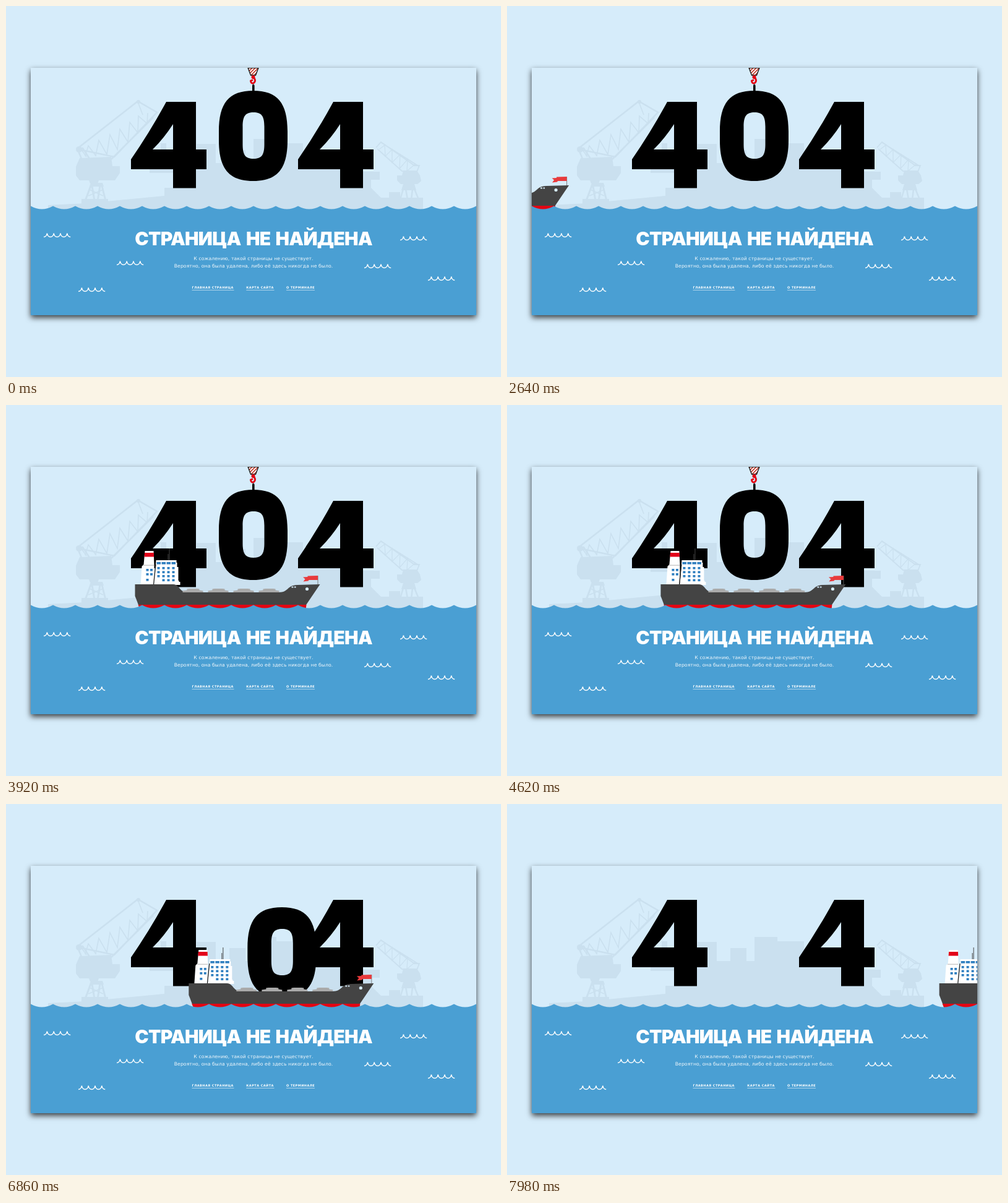
These frames come from a looping animation (800 px wide and 600 px high, 8 s). An HTML page:

```html
<!DOCTYPE html>
<html lang="ru">
<head>
<meta charset="utf-8">
<title>404</title>
<style>
  html, body { margin: 0; width: 100%; height: 100%; overflow: hidden; background: #d6ecfa; }
  #card { position: absolute; left: 40px; top: 100px; width: 720px; height: 400px;
    box-shadow: 0 4px 9px rgba(0, 0, 0, .75); }
  svg { position: absolute; left: 0; top: 0; display: block; }
  text { fill: #fff; text-anchor: middle; }
  .title { font: 900 30px Inter, sans-serif; letter-spacing: -.75px; word-spacing: 3px; }
  .note { font: 7.7px "DejaVu Sans", sans-serif; letter-spacing: .08px; fill-opacity: .92; }
  .link { font: bold 5px "DejaVu Sans", sans-serif; letter-spacing: .45px; text-anchor: start; }
</style>
</head>
<body>
<div id="card"></div>
<svg width="800" height="600" viewBox="0 0 800 600">
  <defs>
    <clipPath id="frame"><rect x="40" y="100" width="720" height="400"/></clipPath>
    <clipPath id="block"><path d="M391.5 100H407.5L403.5 111.5H395.5Z"/></clipPath>
    <path id="four" d="M259 155H307V232H324V264H307V294.5H270V264H202V248Q233 203 259 155ZM270 191Q256 213 237 232H270Z"/>
    <path id="ripple" fill="none" stroke="#fff" stroke-width="1.5"/>
    <path id="hatch" fill="#aaa" d="M0 303V300.500L7 299.500V297.500L11 297H23L27 297.500V299.500L33 300.500V303Z"/>
  </defs>
  <g clip-path="url(#frame)">
    <rect x="40" y="100" width="720" height="400" fill="#d6ecfa"/>

    <!-- harbour silhouettes -->
    <g fill="#cae0ef" stroke="#cae0ef" stroke-width="0">
      <path d="M68 330V322L130 319L256 307V294H270V270H232V236H260V232H308V223H339V254H361V233H387V254H400V215H437V222H480V254H540V268H604V281H590V294L606 310H619V301H637V310H674V330Z"/>
      <path d="M250 232V222H259V232Z"/>
      <path d="M113 260L119 246L170 244L172 259H184V270L176 282H150L148 287H136L134 282H119L113 274Z"/>
      <path d="M137 286H156L158 292H135ZM122 312H165V320H122Z"/>
      <path fill="none" stroke-width="3" d="M137 291L128 315M155 291L161 315M139 291L143 315M152 291L148 315"/>
      <path fill="none" stroke-width="1.500" d="M135 297L157 307M157 297L133 307"/>
      <path fill="none" stroke-width="2.500" d="M122 247L115 230L124 230L135 247M118 232L175 244L244 172L213 154L116 230M170 248L238 180"/>
      <path fill="none" stroke-width="1.600" d="M128 243L133 226L145 242L150 217L163 240L168 208L180 232L184 199L197 220L200 188L213 205L214 178L228 190L229 173M213 155L221 176M120 230L130 244"/>
      <circle cx="214" cy="155" r="3"/><circle cx="118" cy="232" r="5"/>
      <path d="M632 274H640L642 266H664L669 274L671 283L665 288H638L632 282Z"/>
      <path d="M642 288H660L663 298H639ZM630 310H674V315H630Z"/>
      <path fill="none" stroke-width="2.500" d="M642 296L637 313M660 296L667 313M646 296L649 313M657 296L655 313"/>
      <path fill="none" stroke-width="1.800" d="M605 220L667 259M600 231L640 267L664 268L668 258L660 258L606 220L598 229"/>
      <path fill="none" stroke-width="1.200" d="M603 232L612 225L613 243L624 232L624 253L637 240L636 263L649 248L648 267L662 255"/>
    </g>

    <use href="#four"/>
    <use href="#four" x="270"/>

    <path id="zero" fill-rule="evenodd" d="M399.500 137C439 137 455 157 455 203V217C455 263 439 283 399.500 283C360 283 344 263 344 217V203C344 157 360 137 399.500 137ZM400 172C387 172 382.500 178 382.500 195V224C382.500 241 387 247 400 247C413 247 417.500 241 417.500 224V195C417.500 178 413 172 400 172Z"/>

    <g id="hook">
      <path stroke="#111" stroke-width="1.400" d="M393 0V96M406.300 0V96"/>
      <path fill="#111" d="M391.500 94.500H407.500V100H391.500Z"/>
      <path fill="#fff" d="M391.500 100H407.500L403.500 111.500H395.500Z"/>
      <path clip-path="url(#block)" stroke="#c4392b" stroke-width="1.700" d="M387 106L395 98M389 109L400 98M391 112L405 98M395 113L409 99M400 113L410 103"/>
      <path fill="none" stroke="#111" stroke-width="1.300" d="M391 100H408L403.500 112H395.500Z"/>
      <path fill="none" stroke="#e30613" stroke-width="2.800" d="M400 112V116Q403 118 402.500 121.500Q401 125.500 398 125Q395.500 124 395.500 121L399 119.500"/>
      <circle cx="399.500" cy="115" r="3" fill="#e30613"/>
      <path fill="#000" d="M398 138V129Q398 126.500 399.800 126.500T401.600 129V138Z"/>
    </g>

    <g id="ship">
      <path stroke="#444" stroke-width="1" d="M53.500 241V252M55.500 232V252"/>
      <path fill="#fff" d="M16 236H30L31 258V291H9L11 261L14 258Z"/>
      <path fill="#e2001a" d="M15.500 239H30.300L30.600 245.500H15Z"/>
      <path fill="#ccc" d="M13.500 258.500H30.500V260H13Z"/>
      <path fill="#fff" d="M34 251H67V255H68V262H70V284H71V286H73V291H31Z"/>
      <path stroke="#222" stroke-width="1.300" d="M33.500 258L31.500 276L30 291"/>
      <g id="windows" fill="#2f7fc0"></g>
      <path fill="#444" d="M0 290H62C73 291 71 303 86 303H232C249 303 245 291.500 262 291L299 290L276 324V330H8L2 314L0 309Z"/>
      <path fill="#e30613" d="M5 323H277L276 330H8Z"/>
      <use href="#hatch" x="77"/><use href="#hatch" x="118"/><use href="#hatch" x="159"/><use href="#hatch" x="200"/>
      <path fill="#d6ecfa" d="M253 293.500H256V295.500H253ZM257.500 293.500H260V295.500H257.500Z"/>
      <circle cx="278" cy="297.500" r="2.600" fill="#d6ecfa"/>
      <path stroke="#666" stroke-width=".8" d="M295.500 276V290"/>
      <path fill="#e83a3c" d="M295.500 276L279 276.500V278L271.500 278.500L275 281.500L272 285.500L280 284.500L281 283L295.500 283Z"/>
    </g>

    <path id="sea" fill="#4a9fd3"/>
    <g id="ripples"></g>

    <text class="title" x="400" y="387">СТРАНИЦА НЕ НАЙДЕНА</text>
    <text class="note" x="400" y="411">К сожалению, такой страницы не существует.</text>
    <text class="note" x="400" y="423">Вероятно, она была удалена, либо её здесь никогда не было.</text>
    <text class="link" x="300.500" y="456.500">ГЛАВНАЯ СТРАНИЦА</text>
    <text class="link" x="388.300" y="456.500">КАРТА САЙТА</text>
    <text class="link" x="453" y="456.500">О ТЕРМИНАЛЕ</text>
    <path stroke="#fff" stroke-opacity=".7" stroke-width=".8" d="M300.500 459.500H368.500M388.300 459.500H433.500M453 459.500H499"/>
  </g>
</svg>
<script>
const $ = id => document.getElementById(id);
const LOOP = 8000;

$('sea').setAttribute('d', 'M40 323.5' + 'q18 10 36 0'.repeat(20) + 'V500H40Z');

// half a bowl, three whole ones, half a bowl
$('ripple').setAttribute('d',
  'M0 3.5c2.6 0 4.8-2 5.4-6' + 'c.6 4 2.8 6 5.4 6s4.8-2 5.4-6'.repeat(3) + 'c.6 4 2.8 6 5.4 6');
$('ripples').innerHTML = [[61, 370], [637, 375], [179, 415], [579, 420], [682, 440], [117, 458]]
  .map(([x, y]) => `<use href="#ripple" x="${x}" y="${y}"/>`).join('');

const pane = (x, y, w = 4, h = 3.6) => `<rect x="${x}" y="${y}" width="${w}" height="${h}"/>`;
let panes = '';
for (let col = 0; col < 4; col++) {
  panes += pane(35 + col * 8, 254, 6.5);
  for (let row = 0; row < 4; row++)
    if (row < 3 || col > 0) panes += pane(36 + col * 8, 262 + row * 6.5);
}
for (const [x, y] of [[18, 265], [24.5, 265], [24.5, 272], [18, 272], [18, 281]]) panes += pane(x, y);
$('windows').innerHTML = panes;

const bezier = (a, b, s) => 3 * (1 - s) * (1 - s) * s * a + 3 * (1 - s) * s * s * b + s ** 3;

// cubic-bezier(.25, .1, .25, 1) progress between two times
function ease(t, start, end) {
  const u = Math.min(1, Math.max(0, (t - start) / (end - start)));
  let low = 0, high = 1;
  for (let i = 0; i < 24; i++) {
    const mid = (low + high) / 2;
    if (bezier(.25, .25, mid) < u) low = mid; else high = mid;
  }
  return bezier(.1, 1, high);
}

const move = (id, x, y) => $(id).setAttribute('transform', `translate(${x.toFixed(2)} ${y.toFixed(2)})`);

function draw(now) {
  const t = now % LOOP;
  const leave = 523 * ease(t, 6632, 9020);
  const drop = 30 * ease(t, 4960, 6340);
  const lift = 100 * ease(t, 6340, 7000);
  $('ship').style.display = t < 2340 ? 'none' : '';
  move('ship', -271 + 520 * ease(t, 2340, 4730) + leave, 0);
  move('zero', leave, drop);
  move('hook', 0, drop - lift);
}

const began = performance.now();
function tick() {
  draw(performance.now() - began);
  requestAnimationFrame(tick);
}
tick();
</script>
</body>
</html>
```
